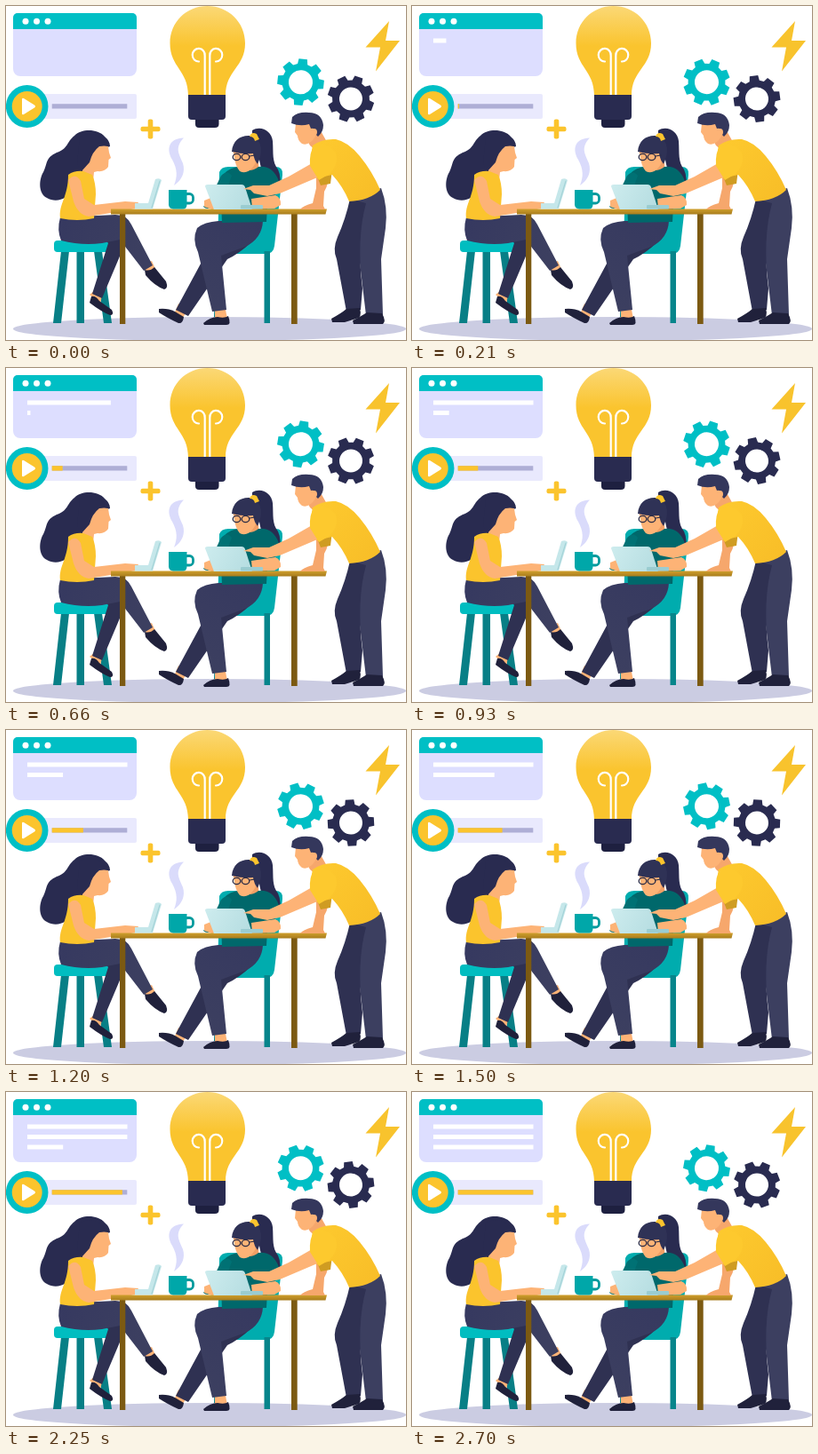
Recreate the animation shown at these times as an HTML page with a canvas. Size 450 px wide and 376 px high, loop 2.73 s.

```html
<!DOCTYPE html>
<html lang="en">
<head>
<meta charset="utf-8">
<title>Team at work</title>
<style>
html, body { margin: 0; width: 100%; height: 100%; overflow: hidden; background: #fff; }
canvas { display: block; width: 450px; height: 376px; }
</style>
</head>
<body>
<canvas id="stage" width="450" height="376"></canvas>
<script>
const ctx = document.getElementById('stage').getContext('2d');
const LOOP = 2730, STEP = 30;
const teal = '#00bfc5', yellow = '#fbc42d', navy = '#292b50', skin = '#fdb376';
const shoe = '#20213b', pants = '#3c3f60', shade = '#2f3152', lavender = '#dddeff', glass = '#c5e7ea';

function fill(d, color) {
  ctx.fillStyle = color;
  ctx.fill(new Path2D(d));
}
function line(d, color, width) {
  ctx.strokeStyle = color;
  ctx.lineWidth = width;
  ctx.lineCap = ctx.lineJoin = 'round';
  ctx.stroke(new Path2D(d));
}
function box(x, y, w, h, color, radius = 0) {
  ctx.fillStyle = color;
  ctx.beginPath();
  ctx.roundRect(x, y, w, h, radius);
  ctx.fill();
}
function oval(x, y, rx, ry, color) {
  ctx.fillStyle = color;
  ctx.beginPath();
  ctx.ellipse(x, y, rx, ry, 0, 0, Math.PI * 2);
  ctx.fill();
}
function fade(x1, y1, x2, y2, from, to) {
  const g = ctx.createLinearGradient(x1, y1, x2, y2);
  g.addColorStop(0, from);
  g.addColorStop(1, to);
  return g;
}

// Sine ease-in-out from 0 to 1 between two times.
function ease(t, start, end) {
  const p = Math.min(1, Math.max(0, (t - start) / (end - start)));
  return (1 - Math.cos(Math.PI * p)) / 2;
}

function browser(t) {
  box(8, 8, 139, 71, lavender, [5, 5, 8, 8]);
  box(8, 8, 139, 18, teal, [5, 5, 0, 0]);
  for (const x of [22, 34.5, 47]) oval(x, 17.3, 3.5, 3.5, '#fff');
  const lines = [[36.5, 0, 900], [48, 455, 2285], [59.5, 1940, 2700]];
  for (const [y, start, end] of lines)
    box(24, y, 112.5 * ease(t, start, end), 5, '#fff');
}

function player(t) {
  box(36, 99, 111, 28, '#e9e9fd', 2);
  box(51.7, 110.2, 84.6, 5.4, '#aeaed5');
  box(51.7, 110.2, 84.6 * ease(t, 0, 2690), 5.4, yellow);
  oval(23.7, 113, 23.8, 24, teal);
  oval(23.7, 113, 17, 17, yellow);
  fill('M18 105 Q18 103 20 104 L32 111.5 Q34 113 32 114.5 L20 122 Q18 123 18 121Z', '#fff');
}

function gear(x, y, hole, color, degrees) {
  ctx.save();
  ctx.translate(x, y);
  ctx.rotate(degrees * Math.PI / 180);
  ctx.beginPath();
  const outline = [[-.27, 21], [-.18, 26.5], [.18, 26.5], [.27, 21]];
  for (let i = 0; i < 8; i++)
    for (const [offset, r] of outline) {
      const a = i * Math.PI / 4 + offset;
      ctx.lineTo(r * Math.cos(a), r * Math.sin(a));
    }
  ctx.closePath();
  ctx.moveTo(hole, 0);
  ctx.arc(0, 0, hole, 0, Math.PI * 2);
  ctx.fillStyle = color;
  ctx.fill('evenodd');
  ctx.restore();
}

function ornaments() {
  box(151.5, 135.7, 22, 5.6, yellow, 2);
  box(159.7, 127.5, 5.6, 22, yellow, 2);
  fill('M431 17 L404.5 46.5 H421 L416 73.5 L443 39 H427Z', '#f8c32d');

  fill('M184.5 42 C184.5 18 203 0 226.5 0 C250 0 269 18 269 42 C269 69 247 72 247 101 L205 101 C205 72 184.5 69 184.5 42Z',
    fade(0, 0, 0, 45, '#fbd876', '#fac42e'));
  line('M223.7 100 V56 A7 7.3 0 1 0 217 62.5 M229.3 100 V56 A7 7.3 0 1 1 236 62.5', '#fff', 2.2);
  fill('M205 100 H247 V124 Q247 128 243 128 H209 Q205 128 205 124Z', navy);
  fill('M213 128 H239.5 V133 Q239.5 137 235 137 H217 Q213 137 213 133Z', '#1e2040');

  fill('M200 148.5 C183 149 180 161 187 173 C193 184 193 192 189 202 C198 196 202 187 199 177 C195 167 189 160 200 148.5Z', '#dadbfb');
}

function seats() {
  fill('M240 187 Q242 181 250 181 H303 Q312 181 311 190 L302 270 Q301 279 292 279 H238Z', '#00acae');
  box(290.5, 276, 6.5, 81, '#07858b');
  fill('M236 277 H243 L241 350 H234Z', '#07858b');
  fill('M62 276 H71 L62 357 H53Z M79.5 276 H88 V357 H79.5Z M99 276 H108 L119 357 H110Z', '#087f86');
  box(54, 264, 64, 13, '#00bdc0', 4);
}

function leftWoman() {
  fill('M94 325 L102 318 L109 322 L106 335Z M153 291 L164 287 L168 296 L160 302Z', skin);
  fill('M101 251 L134 251 Q136 263 130 277 L108 329 L97 324 L115 267Z', shade);
  fill('M61 238 L123 235 Q136 235 141 246 L165 292 L155 298 L128 263 L108 267 Q85 270 62 264 Q57 252 61 238Z',
    fade(60, 240, 155, 280, '#363960', pants));
  fill('M96 327 Q101 326 105 332 L119 342 Q122 348 117 348 Q107 344 94 334Z', shoe);
  fill('M156 297 Q162 299 167 294 L180 310 Q183 318 178 319 Q167 315 157 303Z', shoe);

  fill('M77 146 C85 138 103 138 111 147 Q117 152 117 158 L101 164 Q101 179 91 186 Q78 192 75 205 C70 218 56 222 46 216 C36 211 37 195 42 187 C47 177 44 171 57 165 C70 161 68 153 77 146Z', navy);
  fill('M96 162 Q106 155 115 158 L116 165 L118 171 L115.5 173 L115 181 Q111 187 103 186 L99 187 L98 197 L86 197 L86 183Z', skin);
  fill('M83 147 Q101 138 117 158 Q110 157 105 158 Q97 164 94 176 L85 186 L80 178Z', navy);
  fill('M70 190 Q77 185 87 186 L97 190 Q101 199 101 212 L99 239 Q80 243 61 239 C59 223 70 215 70 190Z', yellow);
  fill('M70 196 Q78 187 84 197 L88 217 L99 224 L134 220 L149 221 L145 228 L130 231 L93 237 Q81 235 76 220Z', skin);
}

function middleWoman() {
  // Ponytail behind the body.
  fill('M277 140 C286 134 299 140 300 152 C301 166 299 175 306 184 Q311 195 306 205 Q299 199 291 189 C282 177 288 165 277 154Z', navy);
  fill('M235 338 L246 337 L249 352 L235 352Z M194 335 L205 342 L198 352 L189 347Z', skin);
  fill('M232 262 L276 266 Q262 279 249 285 L205 349 L191 342 L225 279Z', shade);
  fill('M239 242 L289 242 Q288 262 269 271 Q255 276 242 281 L248 342 L232 344 L216 277 Q209 263 215 250 Q223 243 239 242Z',
    fade(290, 240, 230, 340, '#363960', pants));
  fill('M172 341 Q182 340 190 344 L200 350 Q199 358 194 357 Q181 351 172 345Z', shoe);
  fill('M222 357 Q230 350 238 350 Q246 352 250 349 Q254 359 248 359 H223Z', shoe);

  fill('M262 175 L283 168 L285 187 Q274 195 265 186Z', '#f19f65');
  fill('M244 190 Q252 181 264 181 Q274 189 284 181 Q300 179 307 197 Q306 207 301 216 L294 225 L293 243 L243 244 L242 219Z', '#00686b');
  fill('M242 191 Q249 184 254 191 L248 208 L233 226 Q226 230 222 226 L230 216Z', '#007174');
  fill('M255 161 Q270 155 281 164 Q283 175 278 181 Q271 190 263 186 Q258 180 257 171Z', skin);
  fill('M254 164 C255 151 264 145 275 146 C288 149 290 164 283 178 Q279 173 278 166 Q266 167 254 164Z', '#2f3256');
  fill('M274 147 Q276 141 282 144 L285 150 L280 152 Q279 147 274 147Z', yellow);
  ctx.strokeStyle = '#292b45';
  ctx.lineWidth = 1.3;
  for (const x of [259.5, 269.5]) {
    ctx.beginPath();
    ctx.ellipse(x, 170, 4.3, 3.7, 0, 0, Math.PI * 2);
    ctx.stroke();
  }
  line('M274 169 L280 168', '#292b45', 1.2);
  fill('M223 219 L233 215 L240 226 L232 229 L223 226Z', skin);
  fill('M276 217 L303 213 Q310 216 309 224 L302 228 L277 229Z', skin);
}

function man() {
  fill('M390 216 L422 205 Q430 226 427 250 L422 285 L424 348 L405 348 L397 281Z', pants);
  fill('M387 217 L405 222 Q394 262 401 318 L399 342 L383 344 L372 285 Q367 274 373 260 Q382 240 387 217Z', shade);
  fill('M366 352 Q377 346 383 341 L398 340 Q401 351 394 352 L381 356 H367Z', shoe);
  fill('M390 354 Q400 349 406 345 L423 346 Q428 355 424 358 H391Z', shoe);

  fill('M349 184 L364 181 Q364 199 358 209 L357 225 L359 229 H331 Q334 225 345 222 L349 205Z', '#f6a76c');
  fill('M334 142 L352 137 L361 153 L350 164 L342 157Z', '#f6a76c');
  fill('M326 132 Q337 126 349 134 L348 147 Q341 158 333 155 Q328 151 328 146 L325 142Z', skin);
  fill('M322 125 Q328 119 341 120 Q355 120 357 134 Q357 142 351 147 L347 143 Q348 137 343 138 L341 133 Q331 136 321 132Z', '#34375c');
  oval(346.5, 142, 3.5, 4, skin);

  fill('M350 192 L367 184 L365 200 L354 202Z', '#cf9c22');
  fill('M345 157 Q356 149 371 150 Q385 153 398 169 Q412 186 421 207 Q409 219 386 220 Q379 203 367 190 L349 194 Q340 179 345 157Z',
    fade(350, 155, 415, 215, '#fdc92e', '#f8be28'));
  fill('M346 176 L355 191 L308 211 L294 214 L279 211 L275 207 L267 206 L278 202 L296 202 L318 192Z', skin);
  fill('M347 158 Q364 153 371 165 Q375 178 364 189 L352 196 L342 180 Q341 164 347 158Z', '#fdc92e');
}

function tableItems() {
  box(128, 233, 6.3, 125, '#7c5a12');
  box(321, 233, 6.7, 125, '#7c5a12');
  fill('M118 228.5 H361 L359.5 234.5 H118Z', fade(0, 228.5, 0, 235, '#cf9f2c', '#a57a1c'));

  fill('M160 222 L168 195 Q173 193 175 196 L165 228.5 H145 V222Z', glass);
  line('M173 197 L164 227', '#a4d3d8', 1.2);

  ctx.strokeStyle = '#009a9d';
  ctx.lineWidth = 2.8;
  ctx.beginPath();
  ctx.roundRect(200, 211.5, 10.5, 10.5, 4);
  ctx.stroke();
  fill('M183 207 H203.5 V224 Q203 228.5 199 228.5 H188 Q183.5 228 183 224Z', '#00a7a9');

  fill('M224 203 Q224 201 227 201 H265 Q268 201 269 204 L277 229 H234Z', fade(224, 201, 277, 229, '#cdecee', '#b4dce0'));
  box(264, 224, 25, 4.5, '#9accd1', 1);
}

function draw(t) {
  ctx.fillStyle = '#fff';
  ctx.fillRect(0, 0, 450, 376);
  oval(229, 363.5, 221, 13.5, '#cbcce2');
  browser(t);
  player(t);
  ornaments();
  const turn = 360 * t / LOOP;
  gear(331.5, 85.7, 13.5, teal, 6 - turn);
  gear(388, 104.5, 13, navy, 20 - turn);
  seats();
  leftWoman();
  middleWoman();
  tableItems();
  man();
}

function tick() {
  draw(Math.floor(performance.now() % LOOP / STEP) * STEP);
  requestAnimationFrame(tick);
}
tick();
</script>
</body>
</html>
```
